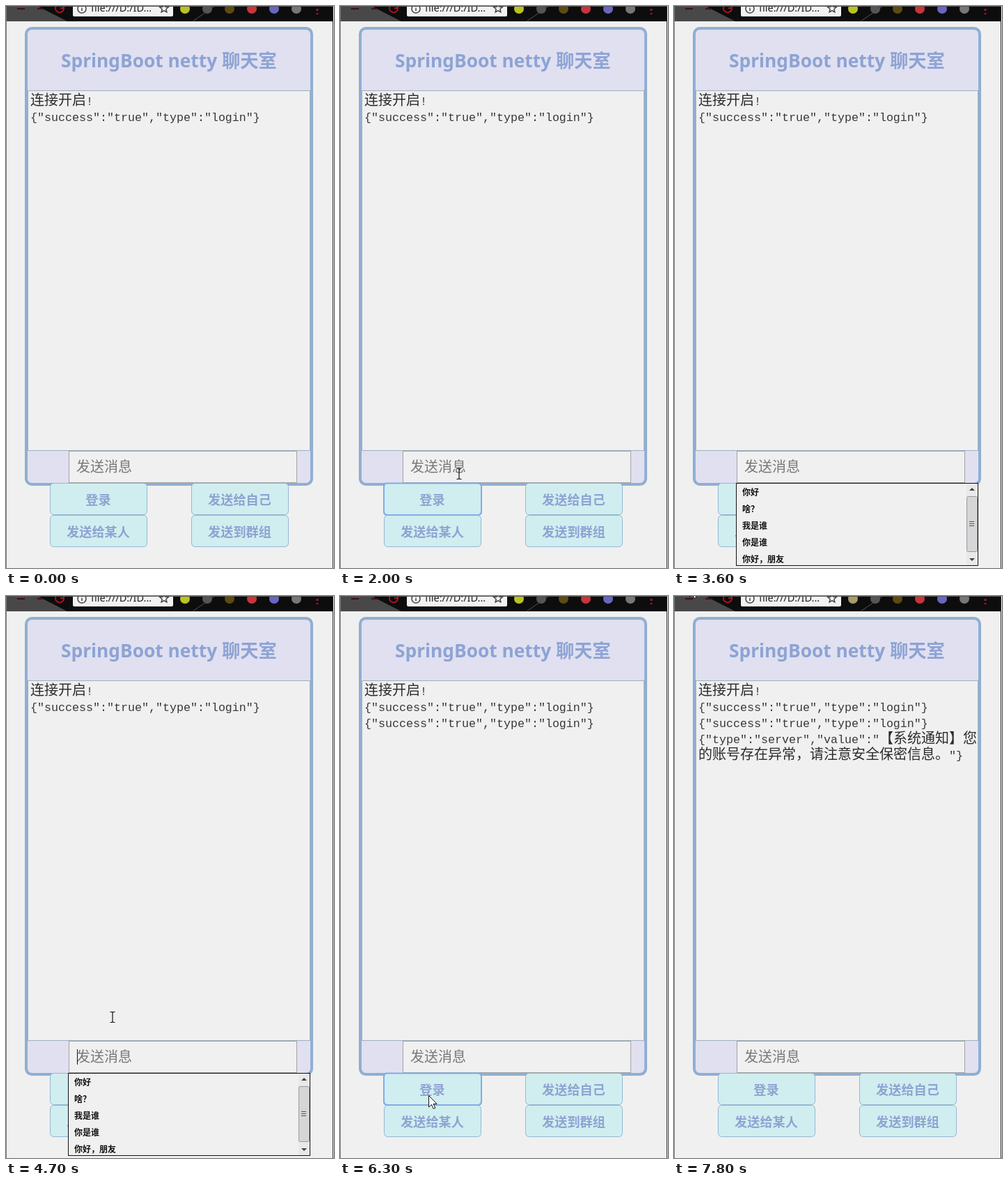
An HTML page for the animation above (7.9 s loop, 471 px wide and 806 px high).

```html
<!DOCTYPE html>
<html lang="zh-CN">
<head>
<meta charset="utf-8">
<style>
html, body { margin: 0; width: 100%; height: 100%; overflow: hidden; background: #f0f0f0; }
svg { display: block; width: 471px; height: 806px; font-family: "Noto Sans", "Noto Sans CJK SC", "Noto Sans CJK", sans-serif; }
.log { font: 300 20px "Noto Sans CJK SC", "Noto Sans CJK", sans-serif; fill: #2c2c2c; white-space: pre; }
.log .latin { font: 16.67px "Liberation Mono", monospace; fill: #383838; }
.button rect { fill: #d0eeef; stroke: #94b6d4; }
.button text { font-size: 18.2px; font-weight: 700; fill: #8fa2d3; text-anchor: middle; }
#menu text { font-size: 12px; font-weight: 600; fill: #111; }
</style>
</head>
<body>
<svg viewBox="0 0 471 806">
  <rect width="471" height="806" fill="#f0f0f0"/>

  <rect width="471" height="22" fill="#0d0d0d"/>
  <path d="M0 0H45L88 22H0z" fill="#484848"/>
  <path d="M268 22L300 0" stroke="#555"/>
  <path d="M16 4h11M45 4h9" stroke="#4a0d10" stroke-width="2"/>
  <path d="M82 0A6 6 0 1 1 72 0M83 -2v5h-5" fill="none" stroke="#a51722" stroke-width="2"/>
  <rect x="96" y="-5" width="144" height="20" rx="2" fill="#f2f2f2"/>
  <g fill="none" stroke="#444" stroke-width="1.5">
    <circle cx="109" cy="4" r="6"/>
    <path d="M109 3v4M109 0v1.5"/>
    <path id="star"/>
  </g>
  <text x="122" y="8" font-size="14.5" fill="#222">file:///D:/ID...</text>
  <g id="icons"></g>
  <path d="M447 -2V12" stroke="#a51722" stroke-width="3" stroke-dasharray="3"/>

  <rect x="29" y="32" width="410" height="654" rx="8" fill="#e0e0f0" stroke="#8fafd2" stroke-width="4"/>
  <text x="79" y="88" font-size="26.3" font-weight="700" fill="#8da3d4">SpringBoot netty 聊天室</text>
  <rect id="area" x="31.5" y="121.5" width="405" height="516" fill="#f0f0f0"/>
  <g id="log" class="log"></g>
  <rect x="90.5" y="638.5" width="327" height="45" fill="#f0f0f0" stroke="#a3a3a3"/>
  <text x="101" y="668" font-size="20" fill="#777">发送消息</text>
  <path id="caret" d="M102.5 650v22" stroke="#111"/>
  <g id="buttons"></g>
  <rect id="ring" x="63" y="684.5" width="140" height="45.5" rx="4" fill="none" stroke="#82abe8" stroke-width="2"/>

  <g id="menu">
    <rect x="89.5" y="684.5" width="347" height="118" fill="#f0f0f0" stroke="#111"/>
    <rect x="420" y="685" width="16" height="117" fill="#e9e9e9"/>
    <rect x="420.5" y="703.5" width="15" height="79" rx="2" fill="#d6d6d8" stroke="#999"/>
    <path d="M424 695h8l-4-4zM424 792h8l-4 4z" fill="#444"/>
    <path d="M424 739.5h7M424 742.5h7M424 745.5h7" stroke="#555"/>
  </g>

  <path d="M.5 0v806" stroke="#777"/>
  <path d="M469.5 0v806" stroke="#222"/>
  <path d="M470.5 0v806" stroke="#f8f8f8"/>
  <path d="M0 .5h470" stroke="#555"/>
  <path id="arrow" d="M.5.5V17l4-3.6 2.7 6 2.6-1.2-2.7-5.8h5z" fill="#fff" stroke="#111"/>
  <path id="beam" d="M-3.5-7.5h2.5l1 1 1-1h2.5M0-7V7M-3.5 7.5h2.5l1-1 1 1h2.5" fill="none" stroke="#111" stroke-width="1.2"/>
</svg>
<script>
const LOOP = 7900, STEP = 100;
const $ = id => document.getElementById(id);
const show = (id, on) => $(id).style.display = on ? "" : "none";
const within = (t, from, to) => t >= from && t < to;
const list = (items, make) => items.map(make).join("");

$("star").setAttribute("d", "M" + Array.from({ length: 10 }, (_, i) => {
  const a = i * Math.PI / 5, r = i % 2 ? 3 : 6.5;
  return [227 + r * Math.sin(a), 3.5 - r * Math.cos(a)];
}).join("L") + "z");

$("icons").innerHTML = list(["#b9c322", "#555", "#5d4b12", "#c9343a", "#6866c2", "#777"], (color, i) =>
  `<circle cx="${257 + i * 32}" cy="4" r="7" fill="${color}"/>`);
const badge = $("icons").firstChild;

// [text, time it appears]
const lines = [
  ['连接开启!', 0],
  ['{"success":"true","type":"login"}', 0],
  ['{"success":"true","type":"login"}', 6000],
  ['{"type":"server","value":"【系统通知】您', 7000],
  ['的账号存在异常，请注意安全保密信息。"}', 7000]
];
$("log").innerHTML = list(lines, ([text], i) =>
  `<text x="35" y="${142 + i * 23}">${text.replace(/[ -~]+/g, s => `<tspan class="latin">${s}</tspan>`)}</text>`);

$("buttons").innerHTML = list(["登录", "发送给自己", "发送给某人", "发送到群组"], (label, i) => {
  const x = 63.5 + i % 2 * 203, y = 684.5 + (i >> 1) * 46;
  return `<g class="button"><rect x="${x}" y="${y}" width="139" height="45" rx="5"/>
    <text x="${x + 69}" y="${y + 30}">${label}</text></g>`;
});

$("menu").innerHTML += list(["你好", "啥？", "我是谁", "你是谁", "你好，朋友"], (item, i) =>
  `<text x="98" y="${702 + i * 24}">${item}</text>`);

// Pointer stops: time, x, y; it eases from one to the next
const stops = [
  [100, 17, -8], [800, 342, 221], [1700, 128, 700], [2000, 171, 671], [2500, 246, 660],
  [3900, 247, 688], [4700, 153, 604], [5150, 340, 600], [5600, 111, 714], [6300, 127, 716], [7700, 22, -16]
];

function pointer(t) {
  const next = stops.findIndex(stop => stop[0] > t);
  if (next < 0) return stops.at(-1).slice(1);
  if (!next || within(t, 2500, 3900)) return null;
  const [t0, x0, y0] = stops[next - 1], [t1, x1, y1] = stops[next];
  const k = (t - t0) / (t1 - t0), ease = k * k * (3 - 2 * k);
  return [x0 + (x1 - x0) * ease, y0 + (y1 - y0) * ease];
}

function draw(t) {
  const menuOpen = within(t, 2300, 4800);
  lines.forEach(([, from], i) => $("log").children[i].style.display = t >= from ? "" : "none");
  show("menu", menuOpen);
  show("caret", menuOpen && (t + 300) % 1000 < 500);
  show("ring", within(t, 1700, 2200) || within(t, 5900, 6800));
  $("area").setAttribute("stroke", within(t, 4800, 5900) ? "#6c99dc" : "#9fb0bd");
  badge.setAttribute("fill", t >= 7300 ? "#a99b68" : "#b9c322");

  const p = pointer(t);
  const overText = p && within(p[0], 31, 437) && within(p[1], 121, 684);
  show("beam", p && overText);
  show("arrow", p && !overText);
  if (p) $(overText ? "beam" : "arrow").setAttribute("transform", `translate(${p.map(Math.round)})`);
}

const start = performance.now();
function tick() {
  const t = (performance.now() - start) % LOOP;
  draw(Math.floor(t / STEP) * STEP);
  requestAnimationFrame(tick);
}
tick();
</script>
</body>
</html>
```
